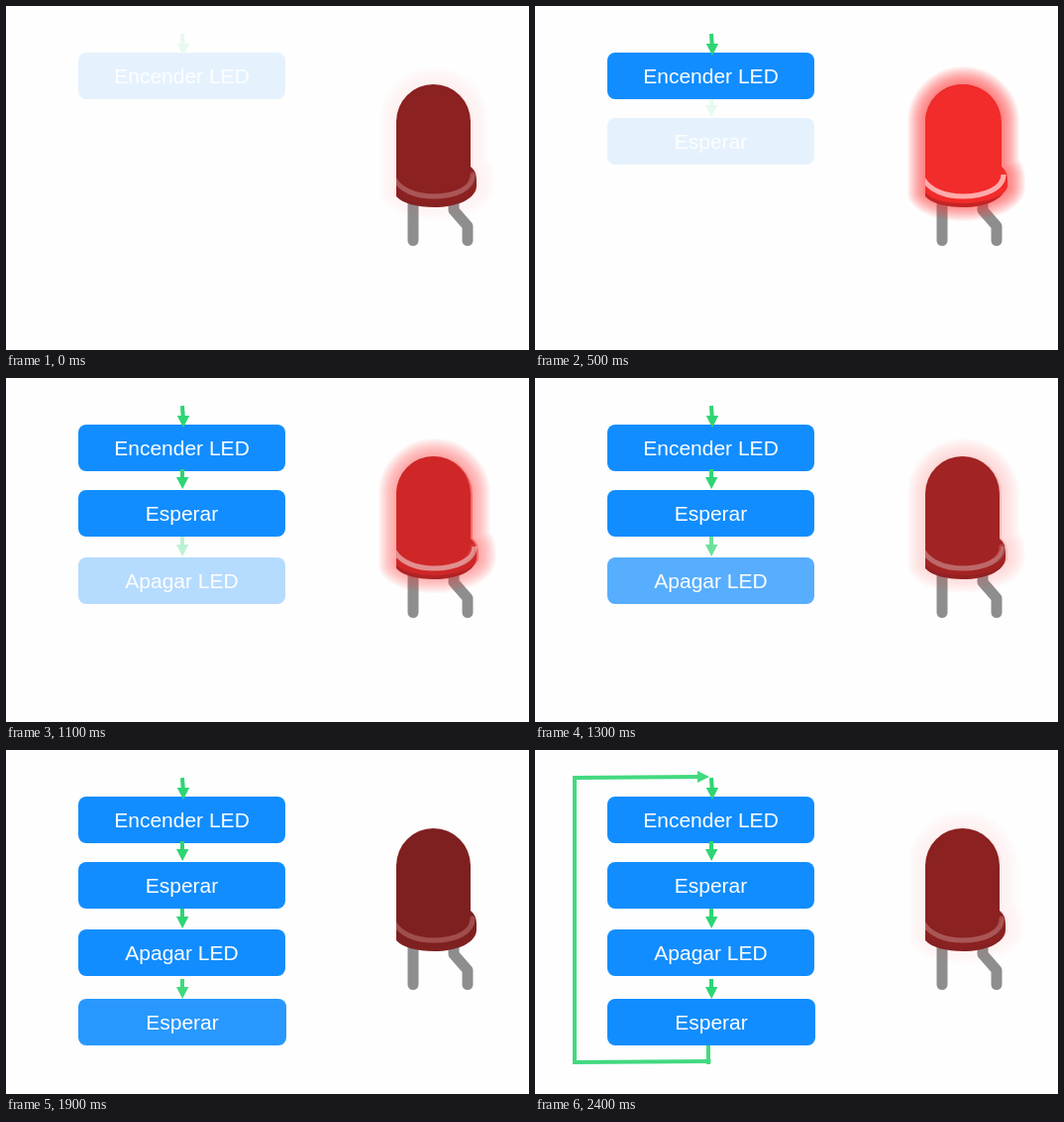
Write an HTML page with a canvas that moves like this. It is 528 by 347 pixels and loops after 2500 ms.

```html
<!DOCTYPE html>
<html lang="es">
<head>
<meta charset="utf-8">
<title>Encender y apagar un LED</title>
<style>
html, body { margin: 0; width: 100%; height: 100%; overflow: hidden; background: #fefefe; }
canvas { display: block; }
</style>
</head>
<body>
<canvas id="stage" width="528" height="347"></canvas>
<script>
const W = 528, H = 347, LOOP = 2500, STEP = 100, FADE = 500;
const BLUE = '#118dff', GREEN = '#2ed573';
const ctx = document.getElementById('stage').getContext('2d');

// Prerendered layers, so that each group fades as a whole.
function layer(draw) {
  const c = document.createElement('canvas');
  c.width = W;
  c.height = H;
  draw(c.getContext('2d'));
  return c;
}

function fillPoly(g, pts) {
  g.beginPath();
  pts.forEach(([x, y]) => g.lineTo(x, y));
  g.closePath();
  g.fill();
}

function strokePoly(g, pts) {
  g.beginPath();
  pts.forEach(([x, y]) => g.lineTo(x, y));
  g.stroke();
}

function box(g, y, w, label) {
  g.fillStyle = BLUE;
  g.beginPath();
  g.roundRect(73, y, w, 47, 8);
  g.fill();
  g.fillStyle = '#fff';
  g.font = '21px "Liberation Sans", Arial, sans-serif';
  g.textAlign = 'center';
  g.fillText(label, 73 + w / 2, y + 31);
}

function downArrow(g, top, tip, lean = 0) {
  g.strokeStyle = g.fillStyle = GREEN;
  g.lineWidth = 4;
  strokePoly(g, [[178, top], [178 + lean, tip - 10]]);
  const x = 178.2 + lean;
  fillPoly(g, [[x - 6.2, tip - 12], [x + 6.2, tip - 12], [x, tip]]);
}

function step(y, w, label, top, tip, lean) {
  return layer(g => {
    box(g, y, w, label);
    downArrow(g, top, tip, lean);
  });
}

// LED body; right is the dome's right side, low the bottom of the rim.
function bulb(right, low) {
  const p = new Path2D(), r = (right - 394) / 2;
  p.moveTo(394, 79 + r);
  p.arc(394 + r, 79 + r, r, Math.PI, 0);
  p.lineTo(right, 162);
  p.quadraticCurveTo(right + 6, 167, right + 6, 175);
  p.lineTo(right + 6, 182);
  p.bezierCurveTo(right + 5, low - 8, 455, low, 432, low);
  p.bezierCurveTo(415, low, 400, low - 4, 394, low - 11);
  p.closePath();
  return p;
}

function led(g, right, low, body, band) {
  const p = bulb(right, low);
  g.fillStyle = body;
  g.fill(p);
  g.save();
  g.clip(p);
  g.strokeStyle = band;
  g.lineWidth = 5;
  g.beginPath();
  g.moveTo(391, 173);
  g.bezierCurveTo(398, 186, 414, 192, 432, 192);
  g.bezierCurveTo(454, 192, right + 2, 184, right + 2, 170);
  g.stroke();
  g.restore();
}

const ledOff = layer(g => {
  g.strokeStyle = '#8e8e8e';
  g.lineWidth = 11;
  g.lineCap = g.lineJoin = 'round';
  strokePoly(g, [[411, 196], [411, 236.5]]);
  strokePoly(g, [[452, 196], [452, 206], [466, 222], [466, 236.5]]);
  led(g, 469, 203, '#7f2020', '#a14d4d');
});

const ledOn = layer(g => {
  const p = bulb(471, 199);
  g.strokeStyle = 'rgba(255, 40, 40, 0.048)';
  g.lineJoin = 'round';
  for (let r = 1; r <= 18; r++) {
    g.lineWidth = 2 * r;
    g.stroke(p);
  }
  led(g, 471, 199, '#f22b2b', '#ffabab');
});

const loopBack = layer(g => {
  g.strokeStyle = g.fillStyle = GREEN;
  g.lineWidth = 4;
  strokePoly(g, [[175, 298], [175, 317]]);
  strokePoly(g, [[177.5, 314], [40, 315], [40, 28], [166, 27]]);
  fillPoly(g, [[164, 21], [176, 27], [164, 33]]);
});

const steps = [
  step(47, 209, 'Encender LED', 28, 50, 0.8),
  step(113, 209, 'Esperar', 92, 112, 0),
  step(181, 209, 'Apagar LED', 160, 180, 0),
  step(251, 210, 'Esperar', 231, 251, 0),
  loopBack
];

const fade = (t, i) => Math.min(1, Math.max(0, (t - i * FADE + 50) / FADE));

function light(t) {
  if (t < 950) return fade(t, 0);
  return 1 - fade(t, t < 1950 ? 2 : 4);
}

function put(img, alpha) {
  ctx.globalAlpha = alpha;
  ctx.drawImage(img, 0, 0);
}

function render(t) {
  ctx.globalAlpha = 1;
  ctx.fillStyle = '#fefefe';
  ctx.fillRect(0, 0, W, H);
  put(ledOff, 1);
  put(ledOn, light(t));
  steps.forEach((s, i) => put(s, fade(t, i)));
}

const start = performance.now();
function tick() {
  const t = (performance.now() - start) % LOOP;
  render(Math.floor(t / STEP) * STEP);
  requestAnimationFrame(tick);
}
tick();
</script>
</body>
</html>
```
